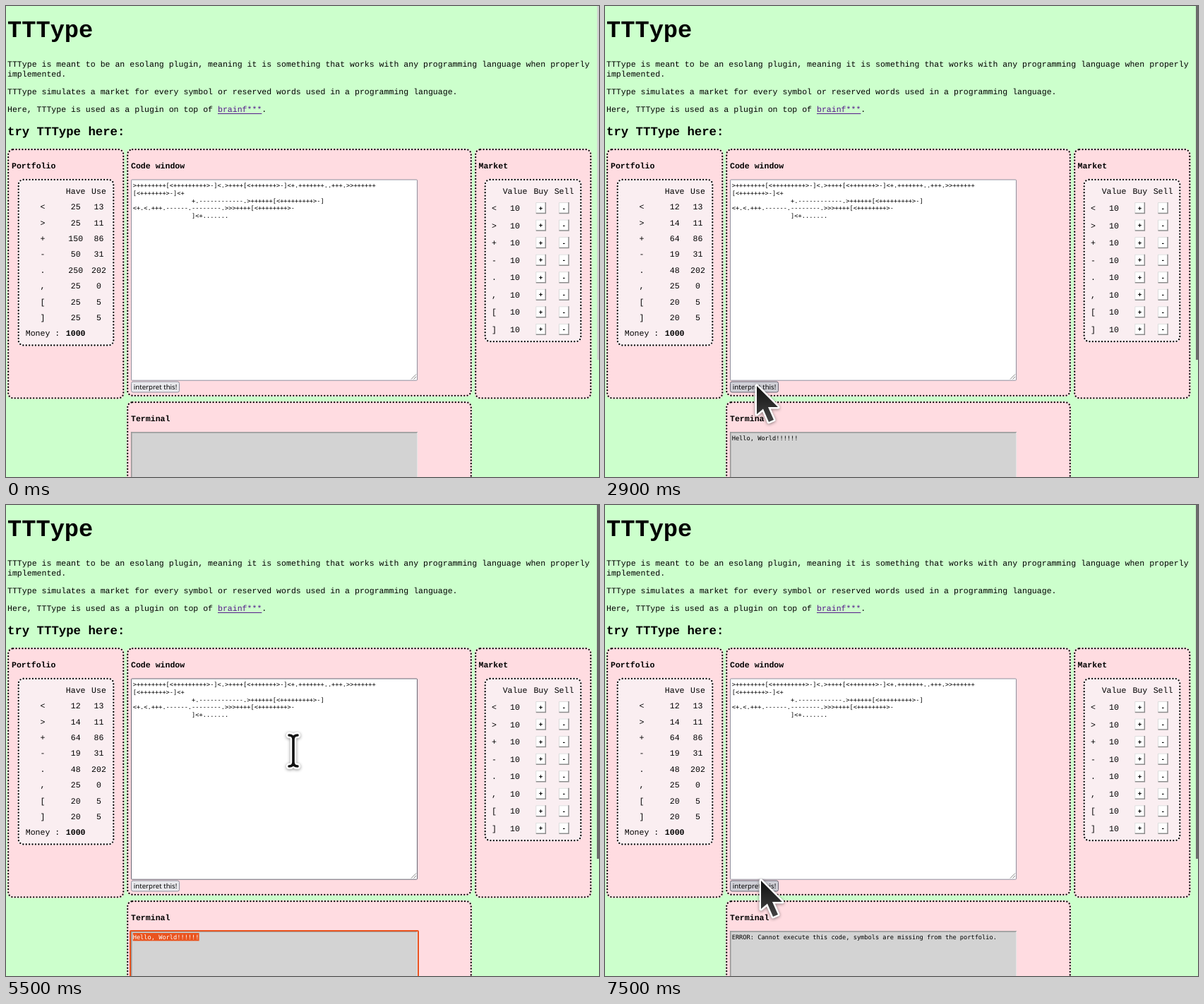
Animation, 840 px wide and 667 px high, one loop 8000 ms. Source, as an HTML page:

```html
<!DOCTYPE html>
<html lang="en">
<head>
<meta charset="utf-8">
<title>TTType</title>
<style>
  html, body { margin: 0; width: 100%; height: 100%; overflow: hidden; background: #ccffcc; }
  svg { display: block; width: 840px; height: 667px; }
  text { font: 11.55px "Liberation Mono", monospace; text-rendering: geometricPrecision; white-space: pre; }
  .mid { text-anchor: middle; }
  .bold { font-weight: bold; }
  .code { font: 8.664px "DejaVu Sans Mono", monospace; }
  .label { font: 9.63px "Noto Sans", sans-serif; text-anchor: middle; }
  .sign { font: bold 9.63px "Noto Sans", sans-serif; text-anchor: middle; }
  .dots { fill: none; stroke: #000; stroke-width: 2.3; stroke-linecap: round; stroke-dasharray: 0 4.4; }
  .ring { fill: none; stroke: #e95420; stroke-width: 2; }
  #field, #button { stroke: #8f8f9d; }
  #button { fill: #e9e9ed; }
  #field.hover { stroke: #676774; }
  #button.hover { fill: #d0d0d7; stroke: #676774; }
  #button.down { fill: #b1b1b9; stroke: #484851; }
  #cursor { filter: drop-shadow(0 1px 2px rgba(0, 0, 0, .45)); }
  .on { fill: #fff; }
</style>
</head>
<body>
<svg viewBox="0 0 840 667">
  <defs>
    <linearGradient id="ink" x1="0" y1="0" x2="0" y2="1">
      <stop offset="0" stop-color="#111"/><stop offset="1" stop-color="#444"/>
    </linearGradient>
  </defs>
  <rect width="840" height="667" fill="#ccffcc"/>
  <rect id="thumb" y="0" height="501"/>

  <text class="bold" x="2" y="44" style="font-size:33.7px">TTType</text>
  <text x="2" y="86">TTType is meant to be an esolang plugin, meaning it is something that works with any programming language when properly</text>
  <text x="2" y="100">implemented.</text>
  <text x="2" y="125">TTType simulates a market for every symbol or reserved words used in a programming language.</text>
  <text x="2" y="150">Here, TTType is used as a plugin on top of <tspan fill="#551a8b">brainf***</tspan>.</text>
  <path d="M300 152.5h62.4" stroke="#551a8b"/>
  <text class="bold" x="2" y="182.5" style="font-size:17.33px">try TTType here:</text>

  <g id="panels"></g>
  <text class="bold" x="8" y="230">Portfolio</text>
  <text class="bold" x="177" y="230">Code window</text>
  <text class="bold" x="669.5" y="230">Market</text>
  <text class="bold" x="177" y="588">Terminal</text>
  <g id="tables"></g>

  <rect id="field" x="177.5" y="246" width="405" height="284.2" rx="1" fill="#fff"/>
  <g id="program"></g>
  <path d="M574 528.5l7-7M577.5 528.5l3.5-3.5" stroke="#777" stroke-width=".9"/>
  <rect id="button" x="177.5" y="532" width="68" height="15" rx="2.5"/>
  <text class="label" x="211.5" y="543">interpret this!</text>

  <rect x="177" y="603" width="406" height="70" fill="#d3d3d3"/>
  <path d="M177 604h406M177.7 603v64" fill="none" stroke="#979797" stroke-width="1.6"/>
  <path d="M582.5 604v63" stroke="#e4e4e4"/>
  <rect id="ring" class="ring" x="176" y="603" width="408" height="90" rx="1"/>
  <rect id="mark" y="606" height="11.3" fill="#e95420"/>
  <text class="code" x="179.7" y="614.6"><tspan id="head"></tspan><tspan id="tail"></tspan></text>

  <g id="cursor">
    <path id="arrow" d="M0 0V40L9 32.500L17 51L24 48L16 30H30Z" fill="url(#ink)" stroke="#fff" stroke-width="5" stroke-linejoin="round" paint-order="stroke"/>
    <g id="beam" fill="none" stroke-linecap="round">
      <path d="M-6-22Q0-22 0-16V16Q0 22-6 22M6-22Q0-22 0-16M0 16Q0 22 6 22" stroke="#fff" stroke-width="8.500"/>
      <path d="M-6-22Q0-22 0-16V16Q0 22-6 22M6-22Q0-22 0-16M0 16Q0 22 6 22" stroke="#111" stroke-width="3.600"/>
    </g>
  </g>
</svg>
<script>
const $ = id => document.getElementById(id);

function add(parent, tag, attrs, text = "") {
  const el = document.createElementNS("http://www.w3.org/2000/svg", tag);
  for (const key in attrs) el.setAttribute(key, attrs[key]);
  el.textContent = text;
  return $(parent).appendChild(el);
}

function panel(x, y, width, height, fill) {
  add("panels", "rect", { x, y, width, height, rx: 8, fill });
  add("panels", "rect", { x: x + 1.2, y: y + 1.2, width: width - 2.4, height: height - 2.4, rx: 7, class: "dots" });
}

const cell = (x, y, text, cls = "") => add("tables", "text", { x, y, class: "mid " + cls }, text);

const pink = "#ffdce1", pale = "#faeef1";
panel(2, 202, 165.5, 354.5, pink);
panel(171, 202, 489, 351, pink);
panel(664, 202, 165.5, 354.5, pink);
panel(171, 560, 489, 130, pink);
panel(16.5, 244.7, 137, 237, pale);
panel(677.5, 244.7, 138, 231.7, pale);

// Portfolio and market tables
const symbols = [..."<>+-.,[]"];
const owned = [25, 25, 150, 50, 250, 25, 25, 25];
const used = [13, 11, 86, 31, 202, 0, 5, 5];

cell(98.7, 266, "Have");
cell(131.5, 266, "Use");
cell(721, 266, "Value");
cell(757.8, 266, "Buy");
cell(790.5, 266, "Sell");

const have = symbols.map((s, i) => {
  const y = 288.4 + i * 22.35;
  cell(52, y, s);
  cell(131.5, y, used[i]);
  return cell(98.7, y, owned[i]);
});
cell(52, 467.2, "Money :");
cell(98.7, 467.2, "1000", "bold");

function tradeButton(x, y, sign) {
  add("tables", "rect", { x: x - 7, y: y - 8, width: 14, height: 16, fill: "#fff" });
  add("tables", "path", { d: `M${x - 7} ${y + 7.5}v-15h14`, fill: "none", stroke: "#ddd" });
  add("tables", "path", { d: `M${x - 7} ${y + 7.5}h13.500v-15.500`, fill: "none", stroke: "#8c8c8c", "stroke-width": 1.5 });
  add("tables", "text", { x: x - .3, y: y + 3.6, class: "sign" }, sign);
}

symbols.forEach((s, i) => {
  const y = 286 + i * 24.55;
  cell(691.5, y + 4, s);
  cell(721, y + 4, "10");
  tradeButton(757.8, y, "+");
  tradeButton(790.5, y, "-");
});

const indent = " ".repeat(16);
[
  ">++++++++[<+++++++++>-]<.>++++[<+++++++>-]<+.+++++++..+++.>>++++++",
  "[<+++++++>-]<+",
  indent + "+.------------.>++++++[<+++++++++>-]",
  "<+.<.+++.------.--------.>>>++++[<++++++++>-",
  indent + "]<+......."
].forEach((line, i) => add("program", "text", { x: 179.7, y: 256.9 + i * 10.83, class: "code" }, line));

// Pointer path: time, x, y
const path = [
  [900, 770, 350], [1000, 600, 343], [1100, 486, 326],
  [1400, 486, 326], [2200, 216, 546], [2300, 215, 538],
  [3600, 215, 538], [4100, 270, 608], [4200, 268, 609],
  [5000, 268, 609], [5500, 407, 348],
  [6000, 407, 348], [6500, 323, 505], [6800, 213, 546], [6900, 211, 533],
  [7000, 211, 533], [7100, 221, 532]
];

function pointer(t) {
  const n = path.findIndex(p => p[0] > t);
  if (n < 0) return path[path.length - 1].slice(1);
  const [t0, x0, y0] = path[n - 1], [t1, x1, y1] = path[n];
  const u = (t - t0) / (t1 - t0), k = u * u * (3 - 2 * u);
  return [x0 + (x1 - x0) * k, y0 + (y1 - y0) * k];
}

const show = (id, on) => $(id).style.display = on ? "" : "none";
const within = (t, a, b) => t >= a && t < b;
const charWidth = 5.216;

function draw(time) {
  const t = Math.floor(time % 8000 / 100) * 100;
  const visible = t >= 900, ran = t >= 2900, failed = t >= 7500;
  const [x, y] = visible ? pointer(t) : [-99, -99];
  const inside = x > 177 && x < 583;
  const inField = inside && within(y, 246, 531);
  const onButton = inside && x < 246 && within(y, 531, 548);
  const beam = inField || inside && y > 603;

  show("cursor", visible);
  show("arrow", !beam);
  show("beam", beam);
  $("cursor").setAttribute("transform", `translate(${x} ${y})`);
  $("field").setAttribute("class", inField ? "hover" : "");
  $("button").setAttribute("class", t === 2800 || t === 7400 ? "down" : onButton ? "hover" : "");

  have.forEach((el, i) => el.textContent = owned[i] - (ran ? used[i] : 0));
  $("thumb").setAttribute("x", ran ? 837 : 837.4);
  $("thumb").setAttribute("width", 3);
  $("thumb").setAttribute("fill", ran ? "#6b6b6b" : "#d0d0d0");

  const part = within(t, 4300, 7400), all = within(t, 4600, 7400);
  const from = all ? 0 : 12;
  show("ring", within(t, 4200, 7400));
  show("mark", part);
  $("mark").setAttribute("x", 179.7 + from * charWidth);
  $("mark").setAttribute("width", (18 - from) * charWidth);
  $("head").textContent = failed ? "ERROR: Cannot execute this code, symbols are missing from the portfolio." : ran ? "Hello, World" : "";
  $("tail").textContent = ran && !failed ? "!!!!!!" : "";
  $("head").setAttribute("class", all ? "on" : "");
  $("tail").setAttribute("class", part ? "on" : "");
}

const start = performance.now();
function tick() {
  draw(performance.now() - start);
  requestAnimationFrame(tick);
}
tick();
</script>
</body>
</html>
```
